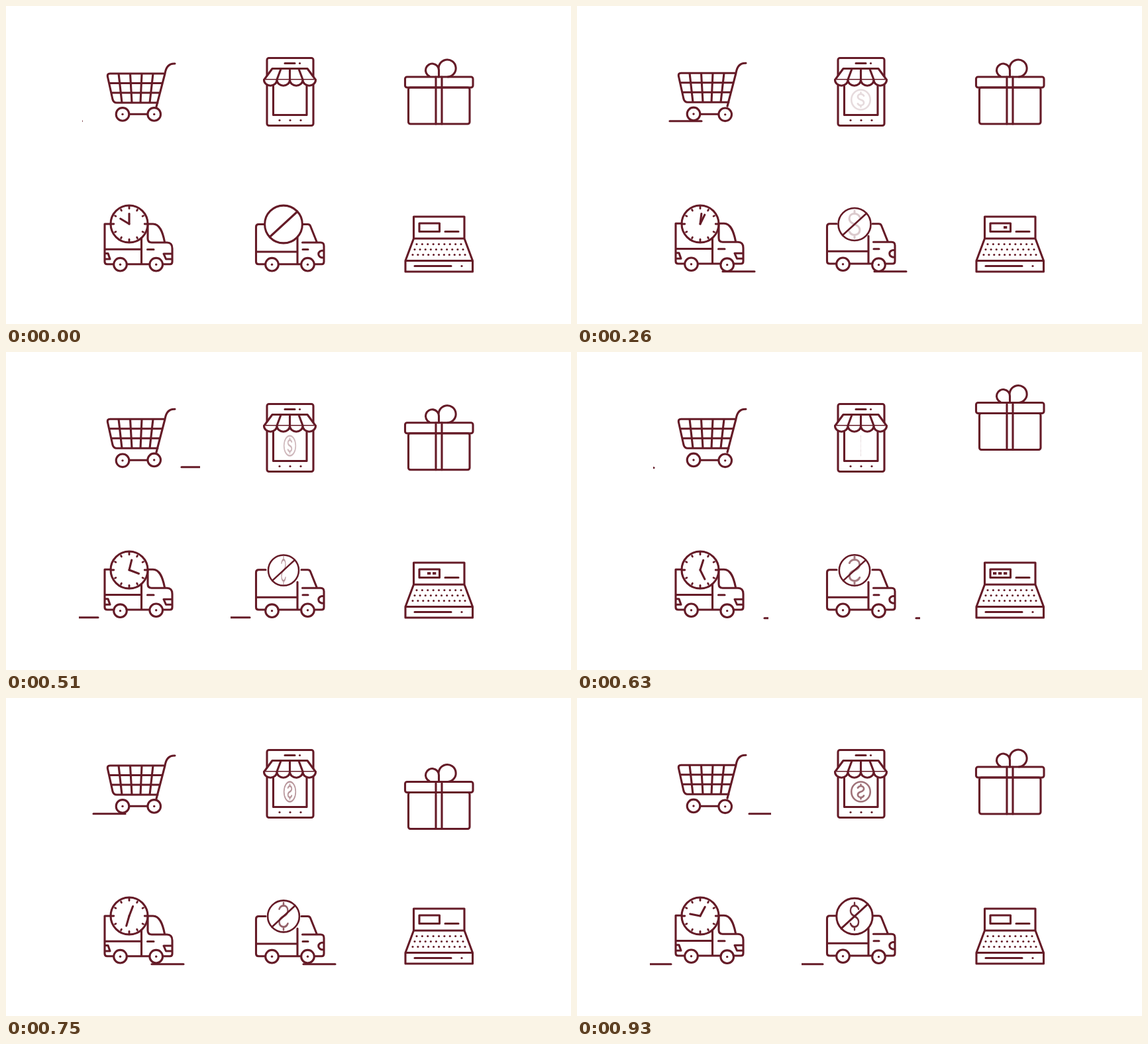
An HTML page that plays this animation: 853x480 px, repeating every 990 ms.

```html
<!DOCTYPE html>
<html lang="en">
<head>
<meta charset="utf-8">
<title>Shopping icons</title>
<style>
  html, body { margin: 0; width: 100%; height: 100%; overflow: hidden; background: #fff; }
  svg { display: block; }
  #stage { fill: none; stroke: #651b27; stroke-width: 3.1; stroke-linecap: round; stroke-linejoin: round; }
  .solid { fill: #fff; }
  .dot { fill: #651b27; stroke: none; }
</style>
</head>
<body>
<svg id="stage" width="853" height="480" viewBox="0 0 853 480">
  <defs>
    <path id="dollar" d="M8-11C6-15 2-16 0-16C-5-16-8-13-8-8.5C-8-3.5-4-1.5 0 0C4 1.5 8 3.5 8 8.5C8 13 5 16 0 16C-2 16-6 15-8 11M0-16V-20.5M0 16V20.5"/>
    <g id="wheel"><circle class="solid" r="9.8"/><circle class="dot" r="1.7"/></g>
  </defs>

  <!-- cart -->
  <path class="body" d="M255 87C246 86.500 241.500 92 240 102L227 152M240 102H157Q152.500 102 153.500 107L161 141Q162.500 146 167 146H229M156 116.500H236M159.500 131H232M170 102L175 146M187.500 102L190 146M205 102L203 146M222 102L217 146"/>
  <path d="M186 163.200H213.500"/>
  <svg x="115" width="178" height="480" viewBox="115 0 178 480"><path class="road" d="M1 174H49"/></svg>
  <use href="#wheel" class="left" data-x="176" data-y="163.4"/>
  <use href="#wheel" class="right" data-x="223.7" data-y="163.4"/>

  <!-- phone shop -->
  <rect x="394" y="78.500" width="70" height="102" rx="3"/>
  <path d="M421 86.500H436M403.500 115V164.500H454V115"/>
  <g class="solid">
    <path d="M402 94.500H455L467.500 111.500H389.500Z"/>
    <path d="M389.500 111.500a9.750 8.700 0 0 0 19.500 0a9.750 8.700 0 0 0 19.500 0a9.750 8.700 0 0 0 19.500 0a9.750 8.700 0 0 0 19.500 0"/>
  </g>
  <path d="M415 95L409 111M428.500 95V111M442 95L448 111"/>
  <g id="phoneDots" class="dot"></g>
  <g id="coin" stroke-width="2.700">
    <circle r="15"/>
    <use href="#dollar" transform="scale(.6 .53)" stroke-width="4.800"/>
  </g>

  <!-- gift -->
  <g id="gift">
    <rect x="607.500" y="123" width="92.500" height="55" rx="3"/>
    <rect x="602.500" y="107" width="102.500" height="16" rx="3"/>
    <path d="M649 107V178M658 107V178M639 106A10 10 0 1 1 653.500 97V107M653.500 97A13 13 0 1 1 667 107"/>
  </g>

  <!-- express truck -->
  <path class="body" d="M158 329H149V386Q149 389.800 153 389.800H247.500Q251 389.800 251 386V366Q251 357 243 357H220Q214 357 214 351V329H222C232 329 236.500 341 239.500 356M204.500 350V389.500M149 367.300H204.500M213.500 367.500H223M149 373.500H154L157 382H149M251 374H238L241.500 382H251"/>
  <svg x="110" width="179" height="480" viewBox="110 0 179 480"><path class="road back" d="M1 401H49"/></svg>
  <use href="#wheel" class="left" data-x="172.5" data-y="390.2"/>
  <use href="#wheel" class="right" data-x="226.7" data-y="390.2"/>
  <g transform="translate(186 329)">
    <circle class="solid" r="28"/>
    <g id="ticks" stroke-width="2.800"></g>
    <path id="hour" d="M0 0V-15.500"/>
    <path id="minute" d="M0 0V-15.500"/>
  </g>

  <!-- free truck -->
  <path class="body" d="M392 329.500H381.500Q377.500 329.500 377.500 333.500V386Q377.500 389.800 381.500 389.800H476.500Q480 389.800 480 386V362Q480 357 475 357H447.500M446 329.500H455.500Q458.500 329.500 459.500 332L469.500 357M440 348V389.500M377.500 371H440M448 367.500H456M480 369C469 368.500 469 380.500 480 380"/>
  <svg x="339" width="179" height="480" viewBox="339 0 179 480"><path class="road back" data-shift="229" d="M1 401H49"/></svg>
  <use href="#wheel" class="left" data-x="401.5" data-y="390.2"/>
  <use href="#wheel" class="right" data-x="455.5" data-y="390.2"/>
  <g transform="translate(419 329.500)">
    <g id="ban"><circle class="solid" r="28.500"/></g>
    <use id="price" href="#dollar"/>
    <path id="slash" d="M21-19.300L-21 19.300"/>
  </g>

  <!-- cash register -->
  <path d="M615.500 351V318H692V351M615.500 351H692L704.500 384.500H603ZM603 384.500V401H704.500V384.500M624 328H654.500V340.500H624ZM663 340.500H683M617 392.500H672"/>
  <g id="keys" class="dot"></g>
  <g id="digits" class="dot">
    <rect x="644" y="332.200" width="5.300" height="3.800"/>
    <rect x="636" y="332.200" width="5.300" height="3.800"/>
    <rect x="628" y="332.200" width="5.300" height="3.800"/>
  </g>
</svg>
<script>
const $ = id => document.getElementById(id);
const all = selector => document.querySelectorAll(selector);
const move = (el, x, y) => el.setAttribute('transform', `translate(${x} ${y})`);
const dot = (x, y, r = 1.6) => `<circle cx="${x}" cy="${y}" r="${r}"/>`;

// Static repeats
$('phoneDots').innerHTML = dot(443.5, 86.5) + [413, 429, 445].map(x => dot(x, 172.5)).join('');
let keys = dot(688, 392.5);
for (let row = 0; row < 3; row++) {
  const count = 9 + row, left = 620 - 3 * row, right = 687 + 3 * row;
  for (let i = 0; i < count; i++)
    keys += dot(left + (right - left) * i / (count - 1), 359.5 + 8 * row, 1.55);
}
$('keys').innerHTML = keys;
for (let i = 0; i < 12; i++)
  $('ticks').innerHTML += `<path d="M0-23.200V${i % 3 ? -24.8 : -27}" transform="rotate(${i * 30})"/>`;

// Stepped clock: start of each step in ms, and how far the motion has run
const LOOP = 990;
const starts = [0, 130, 260, 390, 450, 510, 570, 630, 690, 750, 810, 870, 930];
const phases = [0, 1, 2, 3, 3.5, 4, 4.5, 5, 5.5, 6, 7, 7.5, 8];
const giftJump = { 4: -.3, 4.5: -41, 5: -30.5, 5.5: 2, 6: 19.5, 7: 11, 7.5: 2, 8: -3 };

function draw(u) {
  const second = u >= 4.5;
  const swing = Math.sin(u * Math.PI * 2 / 3) * .5;
  const lift = (Math.cos(u * Math.PI * 2 / 3) - 1) * .5;

  all('.body').forEach(el => move(el, 0, lift));
  all('.left').forEach(el => move(el, el.dataset.x, +el.dataset.y + swing));
  all('.right').forEach(el => move(el, el.dataset.x, +el.dataset.y - swing));

  const forward = second ? 67 + 64 * (u - 5) : Math.max(65.3, 14 + 62.5 * u);
  const backward = second ? 282 - 63 * (u - 5) : 219 - 64.5 * (u - 2);
  all('.road').forEach(el => {
    const x = el.classList.contains('back') ? backward + +(el.dataset.shift || 0) : forward;
    move(el, x, second ? .8 : -.3);
  });

  const turn = (90 + 36 * (u - 5)) * Math.PI / 180;
  const width = Math.cos(turn);
  $('coin').setAttribute('transform', `translate(428.500 141.500) scale(${Math.abs(width) < .03 ? .03 : width} 1)`);
  $('coin').setAttribute('opacity', .077 * u);

  move($('gift'), 0, giftJump[u] || 0);

  $('hour').setAttribute('transform', `rotate(${3.5 * u})`);
  $('minute').setAttribute('transform', `rotate(${-59 + 42.5 * u})`);

  const size = (23 + .3 * (u - 4.25) ** 2) / 28.5;
  $('ban').setAttribute('transform', `scale(${size})`);
  $('slash').setAttribute('transform', `scale(${size})`);
  const spin = (268 + 52 * (u - 7)) * Math.PI / 180;
  $('price').setAttribute('transform', `scale(${Math.cos(spin)} 1)`);
  $('price').setAttribute('opacity', Math.min(1, .115 * u));

  const shown = u < 6 ? Math.floor(u / 1.5) : 0;
  [...$('digits').children].forEach((el, i) => el.setAttribute('opacity', i < shown ? 1 : 0));
}

const begin = performance.now();
function tick() {
  const t = (performance.now() - begin) % LOOP;
  draw(phases[starts.filter(s => s <= t).length - 1]);
  requestAnimationFrame(tick);
}
tick();
</script>
</body>
</html>
```
